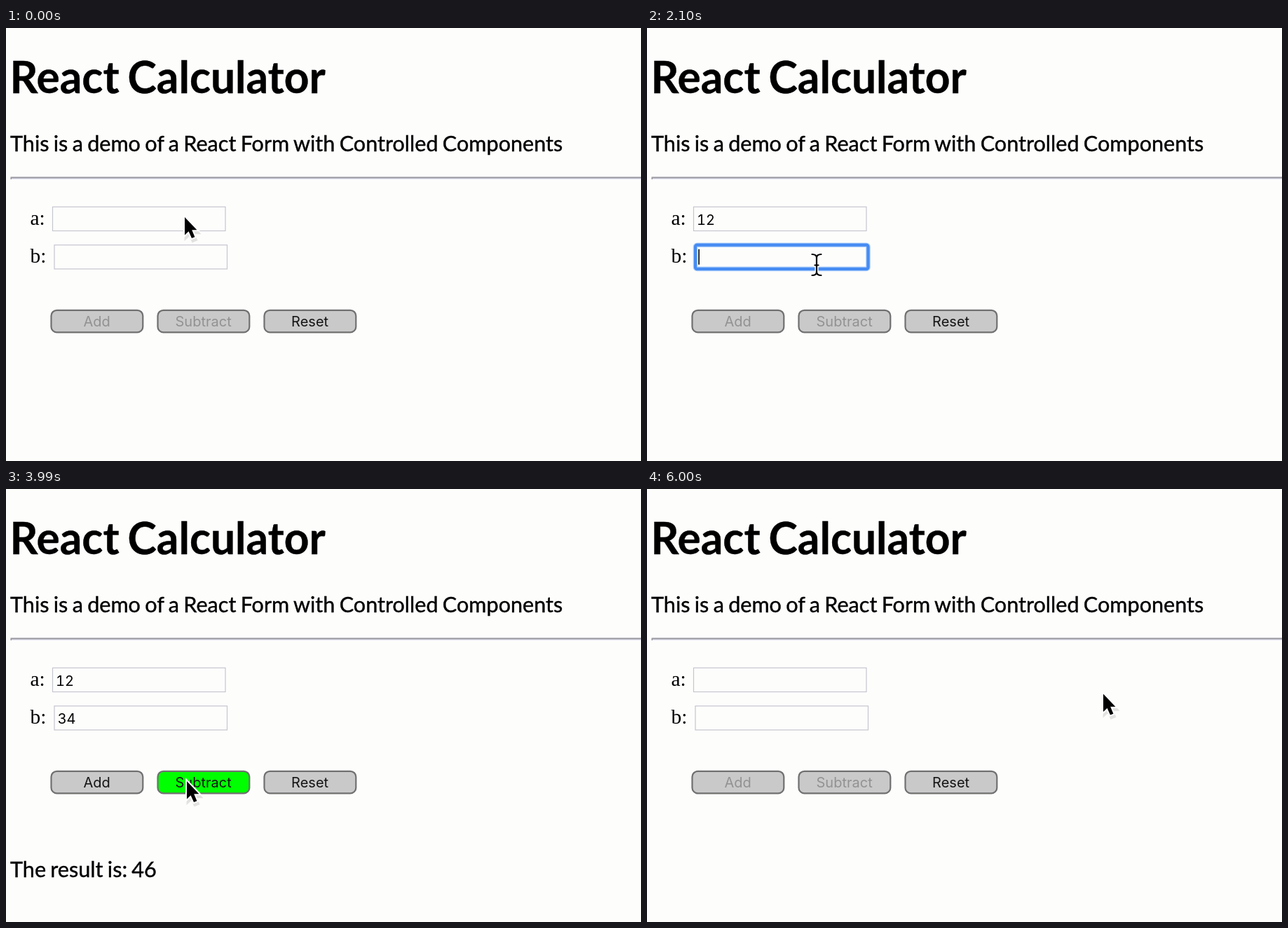
An HTML page for the animation above (6030 ms loop, 906 px wide and 618 px high).

```html
<!DOCTYPE html>
<html lang="en">
<head>
<meta charset="utf-8">
<title>React Calculator</title>
<style>
  html, body { margin: 0; width: 100%; height: 100%; overflow: hidden; background: #fdfdfc; }
  svg { display: block; }
  .lato { font: 30.6px Lato, sans-serif; word-spacing: -.05em; stroke: #000; stroke-width: .4px; }
  .lato.title { font-size: 62.3px; font-weight: 700; }
  .label { font: 29.4px "Liberation Serif", serif; }
  .ui { font: 20px Inter, sans-serif; font-variant-numeric: tabular-nums; }
  .box { fill: none; stroke: #c6c5cf; stroke-width: 1.2px; }
  .ring { fill: none; stroke: #468bf2; stroke-width: 4.2px; }
  .halo { fill: none; stroke: #b0cffa; stroke-width: 6.6px; }
  .button { stroke: #707070; stroke-width: 2.2px; }
</style>
</head>
<body>
<svg width="906" height="618" viewBox="0 0 906 618">
  <defs>
    <path id="arrowShape" d="M0 0V25.5L5.6 20.2L10 30L14.4 28.2L10.2 18.2H17.4Z"/>
    <path id="beamShape" d="M-6.5 -15Q0 -15 0 -10Q0 -15 6.5 -15M0 -10V10M-6.5 15Q0 15 0 10Q0 15 6.5 15M-2.5 .5H2.5"/>
  </defs>
  <text class="lato title" x="5.5" y="93">React Calculator</text>
  <text class="lato" x="6" y="176">This is a demo of a React Form with Controlled Components</text>
  <rect x="6.5" y="212.6" width="900" height="3.4" fill="#e4e4f2"/>
  <path d="M6.5 212.6H906V214.4H8V216H6.5Z" fill="#98989d"/>
  <g id="form"></g>
  <text id="result" class="lato" x="6" y="553.5"></text>
  <g id="arrow">
    <use href="#arrowShape" x="1.5" y="4" stroke="#000" stroke-width="4" opacity=".1"/>
    <use href="#arrowShape" stroke="#fff" stroke-width="4" paint-order="stroke"/>
  </g>
  <g id="beam" fill="none" stroke-linecap="round">
    <use href="#beamShape" stroke="#fff" stroke-width="5"/>
    <use href="#beamShape" stroke="#000" stroke-width="2.2"/>
  </g>
</svg>
<script>
const LOOP = 6030;
const ADDED = 3630, SUBTRACTED = 4230, RESET = 5250;
const $ = id => document.getElementById(id);

function add(tag, attrs, text = '') {
  const el = document.createElementNS('http://www.w3.org/2000/svg', tag);
  for (const key in attrs) el.setAttribute(key, attrs[key]);
  el.textContent = text;
  return $('form').appendChild(el);
}
const show = (el, on) => el.setAttribute('visibility', on ? 'visible' : 'hidden');
const inside = (r, x, y) => x >= r.x && x <= r.x + r.width && y >= r.y && y <= r.y + r.height;

// Each field: focus interval and the times at which its digits are typed.
const fields = [
  { name: 'a', x: 66.5, y: 255.3, value: '12', focus: 200, blur: 1900, keys: [1000, 1250] },
  { name: 'b', x: 69, y: 309.7, value: '34', focus: 1900, blur: 3600, keys: [2500, 2700] }
].map(f => {
  const rect = { x: f.x, y: f.y, width: 246.5, height: 34.2 };
  add('text', { class: 'label', x: 34.5, y: f.y + 25.5 }, f.name + ':');
  add('rect', { class: 'box', ...rect });
  const glow = ['halo', 'ring'].map(c => add('rect', { class: c, rx: 2.5, ...rect }));
  const text = add('text', { class: 'ui', x: f.x + 4.6, y: f.y + 25.4 });
  const caret = add('rect', { y: f.y + 6, width: 1.6, height: 22 });
  return { ...f, rect, glow, text, caret };
});

const buttons = ['Add', 'Subtract', 'Reset'].map((name, i) => {
  const rect = { x: 64.5 + 152 * i, y: 402.8, width: 130.8, height: 31.6 };
  const face = add('rect', { class: 'button', rx: 8, ...rect });
  const text = add('text', { class: 'ui', x: 129.6 + 152 * i, y: 425.5, 'text-anchor': 'middle' }, name);
  return { name, rect, face, text };
});

// Pointer path: time, x, y
const path = [
  [0, 255, 270], [400, 255, 275], [1480, 255, 275], [1850, 242, 338], [2720, 242, 338],
  [3150, 153, 415], [3480, 153, 417.5], [3660, 153, 417.5], [3960, 258, 417], [4260, 258, 417],
  [4620, 399, 421.5], [5600, 399, 421.5], [5940, 651, 292.5], [LOOP, 651, 292.5]
];

function pointer(t) {
  const i = path.findIndex(p => p[0] > t);
  const [t0, x0, y0] = path[i - 1], [t1, x1, y1] = path[i];
  const u = (t - t0) / (t1 - t0), k = u * u * (3 - 2 * u);
  return [x0 + (x1 - x0) * k, y0 + (y1 - y0) * k];
}

function draw(t) {
  const [x, y] = pointer(t);

  for (const f of fields) {
    const typed = f.keys.filter(k => t >= k);
    f.text.textContent = t < RESET ? f.value.slice(0, typed.length) : '';
    const focused = t >= f.focus && t < f.blur;
    f.glow.forEach(g => show(g, focused));
    const since = t - (typed.at(-1) ?? f.focus);
    show(f.caret, focused && since % 1000 < 500);
    f.caret.setAttribute('x', f.x + 4.3 + f.text.getComputedTextLength());
  }

  const ready = fields.every(f => f.text.textContent);
  for (const b of buttons) {
    const enabled = ready || b.name === 'Reset';
    b.face.setAttribute('fill', enabled && inside(b.rect, x, y) ? '#00ff00' : '#c9c9c9');
    b.text.setAttribute('fill', enabled ? '#151515' : '#929292');
  }

  const answer = t < SUBTRACTED ? '46' : '-22';
  $('result').textContent = t >= ADDED && t < RESET ? 'The result is: ' + answer : '';

  const overField = t >= 60 && fields.some(f => inside(f.rect, x, y));
  show($('beam'), overField);
  show($('arrow'), !overField);
  for (const id of ['arrow', 'beam']) $(id).setAttribute('transform', `translate(${x} ${y})`);
}

const start = performance.now();
function tick(now) {
  const t = Math.max(0, now - start) % LOOP;
  draw(Math.floor(t / 30) * 30);
  requestAnimationFrame(tick);
}
draw(0);
requestAnimationFrame(tick);
</script>
</body>
</html>
```
